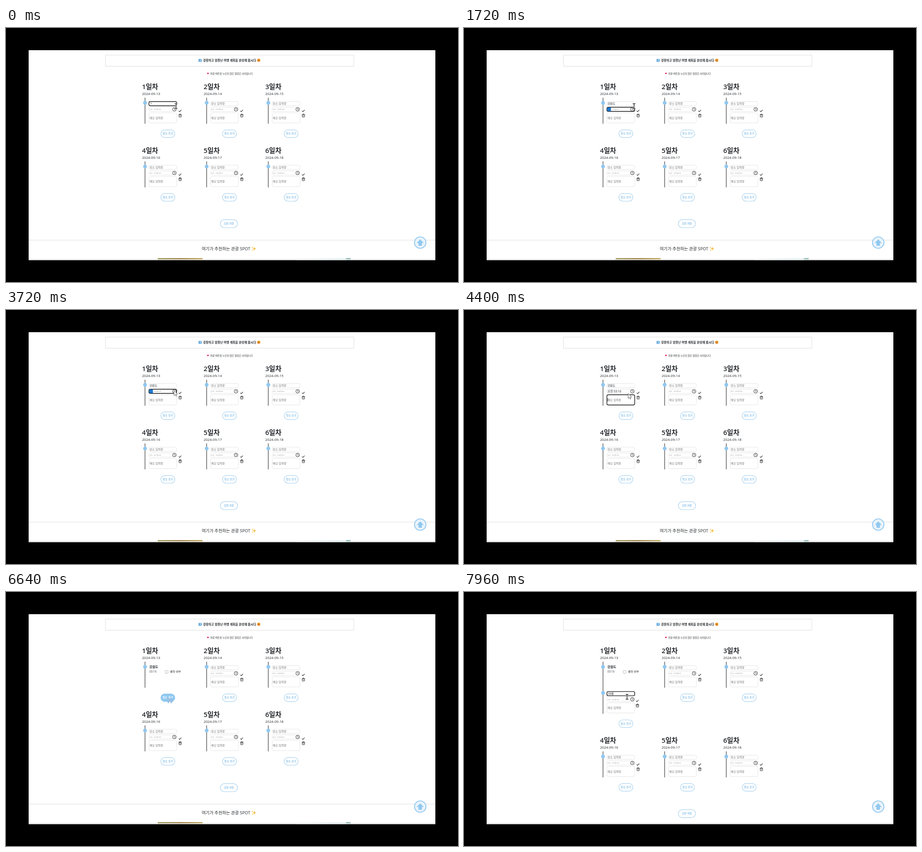
An HTML page with a canvas for the animation above (8 s loop, 998 by 561 pixels).

```html
<!DOCTYPE html>
<html lang="ko">
<head>
<meta charset="utf-8">
<title>여행 계획</title>
<style>
html, body { margin: 0; width: 100%; height: 100%; overflow: hidden; background: #000; }
canvas { display: block; width: 998px; height: 561px; }
</style>
</head>
<body>
<canvas id="stage"></canvas>
<script>
const W = 998, H = 561, LOOP = 8000;
const SANS = '"Open Sans", "Noto Sans CJK KR", "Noto Sans CJK", sans-serif';
const MONO = '"Noto Sans Mono", monospace';
const BLUE = '#90c8f0', INK = '#24282c', HINT = '#6e6e6e', EDGE = '#e2e2e2';
const SAVE_AT = 5000, ADD_AT = 6700, SHIFT = 57.4;

const canvas = document.getElementById('stage');
const ctx = canvas.getContext('2d');
const dpr = window.devicePixelRatio || 1;
canvas.width = W * dpr;
canvas.height = H * dpr;

// [time, text] while syllables are composed
const firstPlace = [[0, 'ㄱ'], [130, '가'], [280, '강'], [430, '강ㅇ'], [550, '강우'],
  [680, '강워'], [820, '강원'], [960, '강원ㄷ'], [1090, '강원도']];
const secondPlace = [[0, ''], [7400, 'ㄱ'], [7550, '가'], [7750, '가ㅍ'], [7880, '가펴']];
const focusSteps = [[0, 'place'], [1450, 'time'], [2300, ''], [3280, 'time'], [4200, 'memo'], [4960, '']];

// [time, x, y, shape]
const pointer = [
  [0, 375.5, 172.5, 'beam'], [2050, 375.5, 172.5, 'arrow'], [2450, 380, 246.5, 'arrow'],
  [3000, 380, 246.5, 'arrow'], [3250, 371, 178, 'arrow'], [3900, 371, 178, 'arrow'],
  [4150, 362.5, 184.5, 'arrow'], [4450, 362.5, 184.5, 'arrow'], [4700, 383, 182, 'plane'],
  [5020, 383, 182, 'plane'], [5230, 390.5, 188, 'plane'], [5700, 390.5, 188, 'plane'],
  [6150, 355.5, 233, 'plane'], [6740, 355.5, 233, 'beam'], [6950, 360, 231.5, 'beam'],
  [LOOP, 360, 231.5, 'beam']
];

const stepAt = (steps, t) => steps.filter(s => s[0] <= t).pop()[1];

function text(s, x, y, size, color = INK, weight = 400, align = 'left', family = SANS) {
  ctx.font = `${weight} ${size}px ${family}`;
  ctx.fillStyle = color;
  ctx.textAlign = align;
  ctx.fillText(s, x, y + size * 0.36);
  return ctx.measureText(s).width;
}

function box(x, y, w, h, r, stroke, width = 1, fill) {
  ctx.beginPath();
  ctx.roundRect(x, y, w, h, r);
  if (fill) { ctx.fillStyle = fill; ctx.fill(); }
  if (stroke) { ctx.strokeStyle = stroke; ctx.lineWidth = width; ctx.stroke(); }
}

function rect(x, y, w, h, color) {
  ctx.fillStyle = color;
  ctx.fillRect(x, y, w, h);
}

function disc(x, y, r, color) {
  ctx.beginPath();
  ctx.arc(x, y, r, 0, 7);
  ctx.fillStyle = color;
  ctx.fill();
}

function path(points, { x = 0, y = 0, close = false, fill, stroke, width = 1 }) {
  ctx.beginPath();
  points.forEach(([px, py]) => ctx.lineTo(x + px, y + py));
  if (close) ctx.closePath();
  if (fill) { ctx.fillStyle = fill; ctx.fill(); }
  if (stroke) { ctx.strokeStyle = stroke; ctx.lineWidth = width; ctx.stroke(); }
}

function clock(x, y) {
  ctx.beginPath();
  ctx.arc(x, y, 3.9, 0, 7);
  ctx.strokeStyle = '#333';
  ctx.lineWidth = 1;
  ctx.stroke();
  path([[0, -2.4], [0, 0.2], [1.8, 0.9]], { x, y, stroke: '#333', width: 0.9 });
}

function trash(x, y) {
  const c = '#3c3c3c';
  path([[-3.5, -2.1], [3.5, -2.1]], { x, y, stroke: c });
  path([[-1.4, -2.1], [-1.4, -3.4], [1.4, -3.4], [1.4, -2.1]], { x, y, stroke: c, width: 0.9 });
  box(x - 2.7, y - 2, 5.4, 5.4, 1, c, 1);
  for (const d of [-0.9, 0.9]) path([[d, -0.6], [d, 2]], { x, y, stroke: c, width: 0.7 });
}

function pill(x, y, label, w, h, size, hover) {
  box(x - w / 2, y - h / 2, w, h, h / 2, hover ? BLUE : '#a9d2ee', 1.2, hover ? BLUE : '#fff');
  text(label, x, y - 0.2, size, hover ? '#fff' : '#8fc4ea', 600, 'center');
}

function rail(x, y) {
  rect(x + 6, y + 24, 1.4, 57.4, '#555');
  disc(x + 6.8, y + 35.3, 4.2, BLUE);
}

function caret(x, y, h) {
  rect(x, y - h / 2, 0.8, h, '#111');
}

// x, y: left edge and middle of the day heading
function form(x, y, { place = '', time = '', focus = '', blink = true, icon = 84 } = {}) {
  const edge = name => focus === name ? ['#161616', 1.4] : [EDGE, 0.9];
  const left = x + 16.7;
  box(x + 15.3, y + 32.5, 61.4, 9.2, 3.2, ...edge('place'));
  box(x + 15.3, y + 45, 61.4, 9.2, 3.2, ...edge('time'));
  box(x + 15.3, y + 57.3, 61.4, 22.4, 3.2, ...edge('memo'));

  if (place || focus === 'place') {
    const w = text(place, left, y + 36.9, 6.2, INK, 500);
    if (focus === 'place' && blink) caret(left + w + 0.2, y + 37.1, 6.6);
  } else {
    text('장소 입력창', left, y + 36.9, 6.2, HINT);
  }

  const marked = focus === 'time' && !time;
  if (marked) rect(x + 16.2, y + 45.7, 8, 7.8, '#0b6fd0');
  if (time) {
    text(time, left, y + 49.3, 6.5, INK, 500);
  } else {
    text('-- --:--', left, y + 49.3, 5.4, '#333', 600, 'left', MONO);
    if (marked) text('--', left, y + 49.3, 5.4, '#cfe6fa', 600, 'left', MONO);
  }
  clock(x + 71.5, y + 49.6);

  text('메모 입력창', left, y + 68.3, 6.2, HINT);
  if (focus === 'memo' && blink) caret(left, y + 68.3, 7.4);

  path([[-2.8, 0], [-0.9, 2], [2.9, -2]], { x: x + icon, y: y + 53, stroke: '#333', width: 1.1 });
  trash(x + icon + 0.3, y + 63.4);
}

function savedEntry(x, y) {
  text('강원도', x + 16.2, y + 35.5, 7.1, INK, 700);
  text('03:16', x + 16.2, y + 46.2, 6.2, '#444');
  box(x + 51.3, y + 43.4, 6.2, 6.2, 1.3, '#a8a8a8', 0.8);
  text('예약 여부', x + 61.8, y + 46, 6.1, INK);
}

function heading(day, x, y) {
  text(`${day}일차`, x, y, 14.8, INK, 600);
  text(`2024-09-${12 + day}`, x + 0.2, y + 15.6, 7.7, INK);
}

function firstDay(x, y, t) {
  heading(1, x, y);
  rail(x, y);
  const blink = t >= 100 && (t < 1450 || Math.floor((t - 4200) / 500) % 2 === 0);
  if (t < SAVE_AT) {
    form(x, y, {
      place: stepAt(firstPlace, t),
      time: t >= 3750 ? '오전 03:16' : '',
      focus: stepAt(focusSteps, t),
      blink
    });
  } else {
    savedEntry(x, y);
  }
  const added = t >= ADD_AT;
  if (added) {
    rail(x, y + SHIFT);
    form(x, y + SHIFT, {
      place: stepAt(secondPlace, t),
      focus: t >= 7150 ? 'place' : '',
      icon: 82.4
    });
  }
  const hover = t >= 6080 && !added;
  pill(x + 57.2, y + 103.5 + (added ? SHIFT : 0), '장소 추가', 31, 16.8, 5.8, hover);
}

function banner() {
  box(219.5, 59.8, 548.5, 24.6, 0, '#dedede', 1);
  rect(425.4, 68.2, 1, 7, '#4d86b8');
  box(426, 68.4, 6.2, 5.8, 0.6, null, 0, '#5ba7e0');
  rect(428, 70, 2.6, 2, '#d7ecfa');
  text('굉장하고 엄청난 여행 계획을 완성해 봅시다', 435, 71.3, 6.55, INK, 600);
  disc(558, 71.3, 3.5, '#f29a2e');
  disc(556.8, 70.5, 0.6, '#6b3a10');
  disc(559.2, 70.5, 0.6, '#6b3a10');
  rect(556.6, 72.3, 2.8, 0.8, '#8a3b1c');
  disc(445.9, 100.2, 1.8, '#e3286c');
  text('저장 버튼을 누르지 않은 일정은 사라집니다', 451, 101.2, 5.25, INK, 500);
}

function sparkle(x, y, r) {
  const points = [];
  for (let i = 0; i < 8; i++) {
    const a = i * Math.PI / 4, d = i % 2 ? r * 0.32 : r;
    points.push([Math.sin(a) * d, -Math.cos(a) * d]);
  }
  path(points, { x, y, close: true, fill: '#f7b731' });
}

function spots(dy) {
  rect(50, 468 + dy, 898, 1, '#dedede');
  text('여기가 추천하는 관광 SPOT', 432.3, 487.2 + dy, 9.3, INK, 500);
  sparkle(548.4, 487.5 + dy, 4.6);
  sparkle(544.2, 484.6 + dy, 2.1);
  sparkle(544.6, 491 + dy, 1.9);
  const y = 508.4 + dy;
  const g = ctx.createLinearGradient(335, 0, 434, 0);
  g.addColorStop(0, '#8f8a3c');
  g.addColorStop(0.5, '#8d6a25');
  g.addColorStop(1, '#b79a3a');
  rect(335, y, 99, 5, g);
  const sky = ctx.createLinearGradient(640, 0, 751, 0);
  sky.addColorStop(0, '#ffffff');
  sky.addColorStop(1, '#e4f3f8');
  rect(640, y, 111, 5, sky);
  rect(751, y, 10, 5, '#79b0a4');
}

function upButton() {
  disc(914.6, 474, 13.6, BLUE);
  disc(914.6, 474, 11.7, '#e9f3fb');
  path([[0, -7.2], [7.6, 0.8], [3.7, 0.8], [3.7, 7], [-3.7, 7], [-3.7, 0.8], [-7.6, 0.8]],
    { x: 914.6, y: 474, close: true, fill: BLUE });
}

const shapes = {
  beam(x, y) {
    for (const [color, width] of [['#fff', 2.8], ['#111', 1.3]]) {
      const style = { x, y, stroke: color, width };
      path([[0, -5.2], [0, 5.2]], style);
      path([[-3, -5.3], [3, -5.3]], style);
      path([[-3, 5.3], [3, 5.3]], style);
    }
  },
  arrow(x, y) {
    path([[0, 0], [0, 11], [2.6, 8.7], [4.3, 12.4], [6, 11.6], [4.4, 8], [7.8, 7.8]],
      { x, y, close: true, fill: '#fff', stroke: '#555', width: 0.9 });
  },
  plane(x, y) {
    const half = [[0, -8], [1.2, -6.4], [1.2, -2.6], [7, 1.6], [7, 3.3], [1.2, 1.4],
      [1, 5], [3, 6.6], [3, 7.8], [0, 7]];
    const whole = half.concat(half.map(([a, b]) => [-a, b]).reverse());
    ctx.save();
    ctx.translate(x + 5.6, y + 5.6);
    ctx.rotate(-Math.PI / 4);
    path(whole, { close: true, fill: '#9cc3e6', stroke: '#86abcf', width: 0.5 });
    ctx.restore();
  }
};

function drawPointer(t) {
  const i = pointer.findIndex(k => k[0] > t);
  const [t0, x0, y0, shape] = pointer[i - 1], [t1, x1, y1] = pointer[i];
  const p = (t - t0) / (t1 - t0), e = p * p * (3 - 2 * p);
  shapes[shape](x0 + (x1 - x0) * e, y0 + (y1 - y0) * e);
}

function draw(t) {
  ctx.setTransform(dpr, 0, 0, dpr, 0, 0);
  rect(0, 0, W, H, '#000');
  ctx.save();
  ctx.beginPath();
  ctx.rect(50, 49, 898, 463.7);
  ctx.clip();
  rect(50, 49, 898, 464, '#fff');
  banner();

  const dy = t >= ADD_AT ? SHIFT : 0;
  firstDay(300.2, 130, t);
  for (let day = 2; day <= 6; day++) {
    const x = 300.2 + (day - 1) % 3 * 136.1;
    const y = day > 3 ? 270.6 + dy : 130;
    heading(day, x, y);
    rail(x, y);
    form(x, y);
    pill(x + 57.2, y + 103.5, '장소 추가', 31, 16.8, 5.8);
  }
  pill(492.2, 432.2 + dy, '일정 저장', 38, 17.6, 5.6);
  spots(dy);
  rect(50, 510.4, 898, 2.3, '#e4e4e4');
  upButton();
  drawPointer(t);
  ctx.restore();
}

function tick() {
  draw(performance.now() % LOOP);
  requestAnimationFrame(tick);
}
tick();
</script>
</body>
</html>
```
